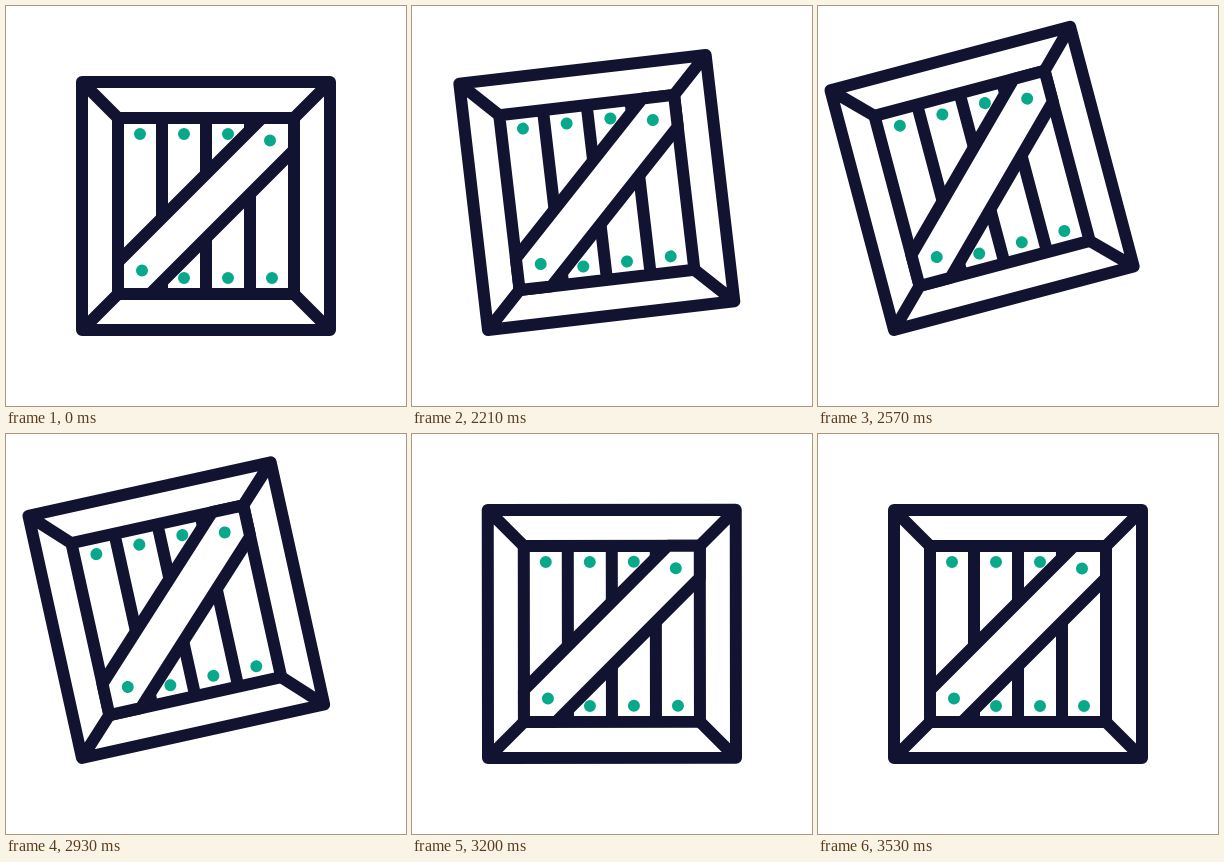
These frames come from a looping animation (400 px wide and 400 px high, 3.56 s). An HTML page:

```html
<!DOCTYPE html>
<html>
<head>
<meta charset="utf-8">
<style>
  html, body { margin: 0; height: 100%; overflow: hidden; background: #fff; }
  svg { display: block; width: 100%; height: 100%; }
</style>
</head>
<body>
<svg viewBox="0 0 400 400">
  <g id="crate" fill="none" stroke="#121331" stroke-width="12" stroke-linejoin="round">
    <path d="M76 76H324V324H76ZM76 76L112 112M324 76L288 112M76 324L112 288M324 324L288 288"/>
    <path d="M112 112H288V288H112ZM156 112V288M200 112V288M244 112V288"/>
    <path fill="#fff" d="M112 256L256 112H288V144L144 288H112Z"/>
    <path stroke="#08a88a" stroke-linecap="round"
      d="M134 128h0M178 128h0M222 128h0M264 134.5h0M136 264.5h0M178 272h0M222 272h0M266 272h0"/>
  </g>
</svg>
<script>
const LOOP = 3560, STEP = 30;
const crate = document.getElementById('crate');

// Cubic Bezier easing with flat ends; x1 and x2 set the influence of each end.
function ease(x, x1, x2) {
  let lo = 0, hi = 1, s = 0.5;
  for (let i = 0; i < 24; i++) {
    s = (lo + hi) / 2;
    const at = 3 * s * (1 - s) ** 2 * x1 + 3 * s * s * (1 - s) * x2 + s ** 3;
    if (at < x) lo = s; else hi = s;
  }
  return s * s * (3 - 2 * s);
}

const lift = x => ease(x, 0.25, 0.45);
const drop = x => 1 - x ** 3.2;

// Tilt in degrees: the crate tips up, falls back and hops once.
const moves = [
  [2000, 2590, 14.87, lift],
  [2590, 3190, 14.87, drop],
  [3190, 3350, 3, lift],
  [3350, 3530, 3, drop]
];

function tilt(t) {
  const move = moves.find(([from, to]) => t >= from && t < to);
  if (!move) return 0;
  const [from, to, size, curve] = move;
  return size * curve((t - from) / (to - from));
}

function draw(now) {
  const t = Math.floor((now % LOOP + 10) / STEP) * STEP - 10;
  crate.setAttribute('transform', `rotate(${-tilt(t)} 76 324)`);
  requestAnimationFrame(draw);
}
draw(performance.now());
</script>
</body>
</html>
```
